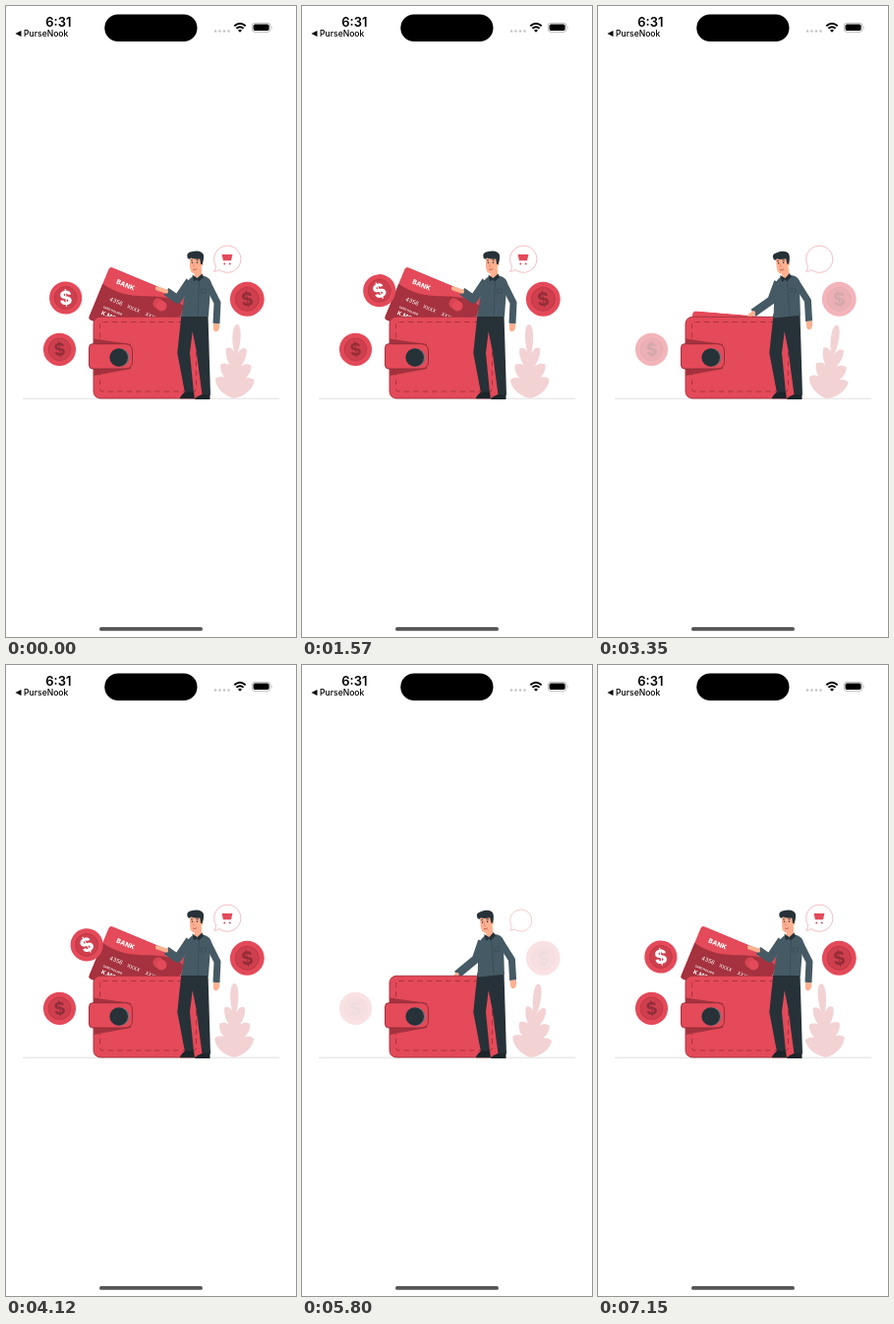
Recreate the animation shown at these times as an HTML page. Size 295 by 640 pixels, loop 7200 ms.

```html
<!DOCTYPE html>
<html lang="en">
<head>
<meta charset="utf-8">
<title>Wallet animation</title>
<style>
  html, body { margin: 0; width: 100%; height: 100%; overflow: hidden; background: #fff; }
  svg { display: block; width: 100vw; height: 100vh; }
  text { font-family: Inter, "Liberation Sans", sans-serif; }
  .red { fill: #e44a59; }
  .dark { fill: #a5323e; }
  .deep { fill: #932d39; }
  .navy { fill: #263238; }
  .shirt { fill: #455a64; }
  .skin { fill: #ffb08f; }
  .sleeve { fill: none; stroke: #455a64; stroke-linejoin: round; }
  .plant { fill: #f3d2d4; }
</style>
</head>
<body>
<svg viewBox="0 0 295 640" preserveAspectRatio="none">
  <defs>
    <clipPath id="scene"><rect y="221" width="295" height="200"/></clipPath>
    <clipPath id="cardShape"><rect width="86" height="58" rx="4"/></clipPath>
    <g id="coin">
      <circle r="16.6" class="red"/>
      <circle r="11.4" fill="#cf3f4d" stroke="#b93744" stroke-width=".8"/>
    </g>
  </defs>

  <!-- status bar -->
  <text x="40.2" y="21" font-size="13" font-weight="600">6:31</text>
  <path d="M9.5 28L15.5 25V31Z"/>
  <text x="18" y="31" font-size="8.6" font-weight="500">PurseNook</text>
  <rect x="100.3" y="8.5" width="94.2" height="27.5" rx="13.75"/>
  <g fill="#c4c4c6">
    <circle cx="213" cy="25.5" r="1.3"/><circle cx="217.5" cy="25.5" r="1.3"/>
    <circle cx="222" cy="25.5" r="1.3"/><circle cx="226.5" cy="25.5" r="1.3"/>
  </g>
  <g fill="none" stroke="#000" stroke-width="1.9">
    <path d="M232.3 20.3Q238 15.2 243.7 20.3"/>
    <path d="M234.4 22.8Q238 19.6 241.6 22.8"/>
  </g>
  <path d="M236 24.7Q238 23 240 24.7L238 26.8Z"/>
  <rect x="250.3" y="17.3" width="18.6" height="9" rx="2.8" fill="none" stroke="#a8a8a8" stroke-width=".8"/>
  <rect x="251.6" y="18.6" width="16" height="6.4" rx="1.7"/>
  <path d="M270 20.2Q271.4 21.8 270 23.4Z" fill="#a8a8a8"/>
  <rect x="95" y="630" width="105" height="3.8" rx="1.9" fill="#555"/>

  <g clip-path="url(#scene)">
    <path d="M17 398.2H278" stroke="#dcdcdc" stroke-width=".9"/>

    <g id="plant" class="plant">
      <path d="M232 398C222 396 213 388 212 379C217 374 224 377 228.500 382
        C221 379 216 371 217 364C222 361 228 364 230 369
        C224 363 221 354 222 347.500C226 345 230 349 231 354
        C226.500 341 227 323 232 323S237.500 341 233.500 354
        C235 349 239 345 242.500 347.500C244 354 240 363 234.500 369
        C237 364 243 361 248 364C249 371 243 379 236 382
        C241 377 247 374 252 379C251 388 242 396 232 398Z"/>
    </g>

    <g class="side">
      <use href="#coin" x="54.5" y="348.3"/>
      <text transform="translate(54.5 348.3) rotate(-8)" y="6.3" font-size="17.5" font-weight="700" text-anchor="middle" class="deep">$</text>
    </g>
    <g class="side">
      <use href="#coin" transform="translate(245.3 297.3) scale(1.05)"/>
      <text transform="translate(245.3 297.3) rotate(-8)" y="6.6" font-size="18.5" font-weight="700" text-anchor="middle" class="deep">$</text>
    </g>

    <g id="bubble">
      <path d="M213.5 263.5A13.6 13.6 0 1 1 217 267.5Q214.5 269.5 211.7 269.3Q213.7 267 213.5 263.5Z"
        fill="#fff" stroke="#ec9aa2" stroke-width=".65"/>
      <g id="cart">
        <path class="red" d="M219.6 252H230.4L229 258.3H220.9Z"/>
        <circle cx="222.3" cy="261.5" r="1" class="red"/><circle cx="227.7" cy="261.5" r="1" class="red"/>
      </g>
    </g>

    <g id="card">
      <g clip-path="url(#cardShape)">
        <rect width="86" height="58" class="red"/>
        <path class="dark" d="M0 19C22 25 40 16 52 11.500S76 5 86 9V58H0Z"/>
        <circle cx="60" cy="16" r="5.3" fill="#d94453"/><circle cx="64" cy="17" r="5.3" class="red"/>
        <g fill="#fff">
          <text x="12.4" y="13.6" font-size="6.6" font-weight="800">BANK</text>
          <g font-size="5.7">
            <text x="12.7" y="32.3">4356</text><text x="32" y="32.3" font-size="5">XXXX</text><text x="52" y="32.3" font-size="5">XXXX</text>
          </g>
          <text x="9.5" y="41.5" font-size="2.9" font-weight="600">CARD HOLDER</text>
          <text x="10.3" y="48.5" font-size="5.7" font-weight="700">K.MOBEY</text>
        </g>
      </g>
    </g>

    <g class="body">
      <path id="arm" class="sleeve" stroke-width="8.5"/>
      <path id="hand" fill="none" stroke="#ffb08f" stroke-width="4.2" stroke-linecap="round"/>
    </g>

    <!-- wallet -->
    <rect x="89" y="315.3" width="111" height="82.7" rx="7" class="red" stroke="#a5323e" stroke-width=".9"/>
    <rect x="95.5" y="320.5" width="98" height="70.5" rx="3" fill="none" stroke="#a5323e" stroke-width=".9" stroke-dasharray="5.5 4"/>
    <path class="dark" d="M89.3 337.5L127 343V368L89.3 375Z"/>
    <path class="red" d="M88 342.7H121Q128.5 342.7 128.5 350V360.5Q128.5 368 121 368H88Q84.5 368 84.5 364V346.7Q84.5 342.7 88 342.7Z" stroke="#8d2c37" stroke-width=".9"/>
    <circle cx="116" cy="356.5" r="9.3" fill="#66757d"/>
    <circle cx="114.7" cy="356.5" r="9.3" class="navy"/>

    <!-- legs -->
    <path class="navy" d="M178.5 312H205.5L208 394.5H199.5L193.5 349L189.7 330L187 352L191 392.5H182L174.3 352Z"/>
    <path fill="#1c262b" d="M182 391.5H191L192 398.3H177Q177 395.5 182 391.5ZM199.5 394H207.5V399H192Q192.5 396.5 199.5 394Z"/>

    <g class="body">
      <path class="sleeve" stroke-width="7" d="M205 281L215 301L214 322"/>
      <path class="skin" d="M211 322H217Q218 327 215 330Q210.5 331.5 211 326Z"/>
      <path class="shirt" d="M189.5 274.500L200 273.500Q207.500 275 208.500 280L206 315H178.500L181.500 293Q183 278 189.500 274.500Z"/>
      <path d="M196.500 277L195 315M198.500 287H203.500V291H198.500Z" fill="none" stroke="#37474f" stroke-width=".6"/>
      <path class="skin" d="M191.5 266H199V274L195 278L191.5 274Z"/>
      <path class="navy" d="M189.5 272.5L194.500 276L199.500 271.500L201 275L196 279.500L194 277.500L191 279.500Z"/>
      <path class="skin" d="M187 254H199V263Q199 271.5 192.500 271.500Q187.500 271.500 187 265Z"/>
      <circle cx="199" cy="262" r="1.6" class="skin"/>
      <path class="navy" d="M185 256Q182.500 250.500 188.500 249.300Q198 246.800 200.800 252Q201.800 256 199.700 262H198L197.300 256.500Q191 257 188 255.500Q187 257.500 185 256Z"/>
      <path d="M188 258L190 257.7M193.300 257.700L196 258" stroke="#263238" stroke-width=".8"/>
      <circle cx="189.4" cy="260.2" r=".75" class="navy"/><circle cx="194.4" cy="260.2" r=".75" class="navy"/>
      <path d="M191.5 260.5L190.5 264H192" fill="none" stroke="#ed847e" stroke-width=".7"/>
      <path d="M190 267Q192 268.2 194 266.7" fill="none" stroke="#c85a5a" stroke-width=".9"/>
    </g>

    <g id="falling">
      <use href="#coin"/>
      <text y="7" font-size="19.5" font-weight="800" text-anchor="middle" fill="#fff">$</text>
    </g>
  </g>
</svg>
<script>
// The picture advances in even steps; LEAD is where the first cycle begins.
const LOOP = 7200, STEP = 111.7, CYCLE = 2630, LEAD = 45;
const $ = id => document.getElementById(id);
const sides = document.querySelectorAll('.side');
const bodies = document.querySelectorAll('.body');

const ramp = (t, from, to) => Math.min(1, Math.max(0, (t - from) / (to - from)));
const smooth = (t, from, to) => (1 - Math.cos(Math.PI * ramp(t, from, to))) / 2;
const mix = (a, b, k) => a + (b - a) * k;
const mixPoint = (a, b, k) => `${mix(a[0], b[0], k)} ${mix(a[1], b[1], k)}`;
const move = (el, value) => el.setAttribute('transform', value);

// Scales around a fixed point.
const scaleAt = (x, y, s) => `translate(${x} ${y}) scale(${s}) translate(${-x} ${-y})`;

function plantAngle(t) {
  const tip = 235 + 9 * smooth(t, 0, 870) - 17 * smooth(t, 870, 1820) + 8 * smooth(t, 1820, 2450);
  return Math.asin((tip - 232) / 75) * 180 / Math.PI;
}

function draw(time) {
  const stepped = Math.floor((time % LOOP + 16) / STEP) * STEP;
  const t = (stepped - LEAD + CYCLE) % CYCLE;

  sides.forEach(el => el.setAttribute('opacity', ramp(t, 390, 1090)));
  move($('plant'), `rotate(${plantAngle(t)} 232 398)`);

  const pop = 1 - (1 - ramp(t, 250, 700)) ** 2;
  move($('bubble'), scaleAt(212, 269, pop));
  const cart = smooth(t, 800, 1400);
  move($('cart'), scaleAt(225, 256, cart));
  $('cart').setAttribute('opacity', cart);

  // The card pulls the arm up; the upper body straightens a little later.
  const rise = smooth(t, 450, 1400);
  move($('card'), `translate(${mixPoint([95, 316], [105.5, 264], rise)}) rotate(${mix(2, 22.5, rise)})`);
  const lean = mix(-6, 0, smooth(t, 650, 1400));
  bodies.forEach(el => move(el, `rotate(${lean} 193 315)`));
  const wrist = mixPoint([158, 310.5], [163, 289.5], rise);
  $('arm').setAttribute('d', `M187 279L${mixPoint([179, 296.5], [174.5, 297.5], rise)}L${wrist}`);
  $('hand').setAttribute('d', `M${wrist}L${mixPoint([154.5, 314], [154, 286.5], rise)}`);

  const aside = 1 - smooth(t, 900, 2050);
  const above = 1 - smooth(t, 600, 1720);
  move($('falling'), `translate(${60.7 + 41 * aside} ${296 - 94 * above}) rotate(${-5 - 45 * aside})`);
  $('falling').setAttribute('visibility', t < 600 ? 'hidden' : 'visible');
}

const start = performance.now();
function tick() {
  draw(performance.now() - start);
  requestAnimationFrame(tick);
}
tick();
</script>
</body>
</html>
```
